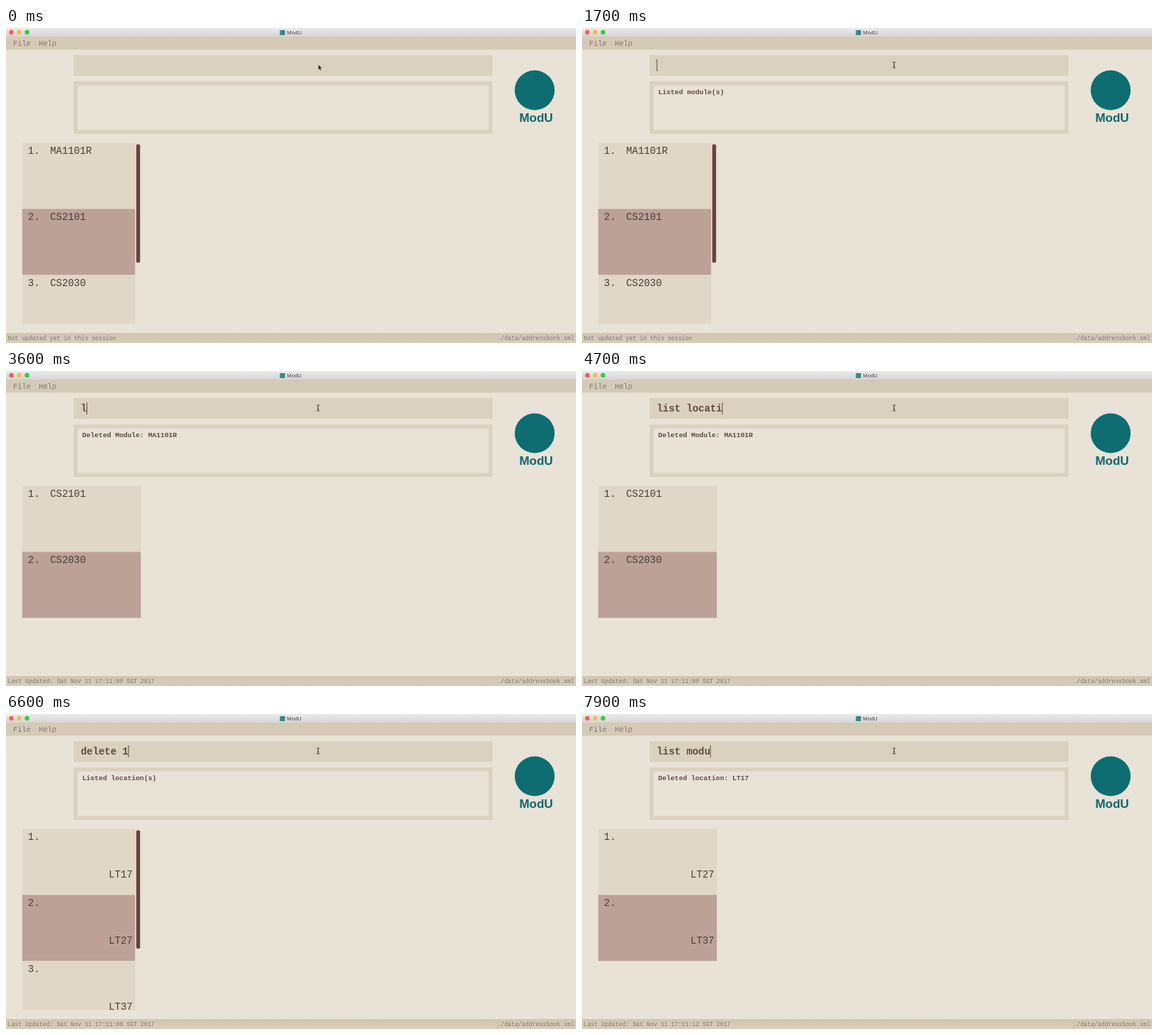
Animation, 800 px wide and 443 px high, one loop 8000 ms. Source, as an HTML page:

```html
<!DOCTYPE html>
<html lang="en">
<head>
<meta charset="utf-8">
<title>ModU</title>
<style>
html, body { margin: 0; width: 100%; height: 100%; overflow: hidden; background: #e8e2d7; }
svg { display: block; width: 100%; height: 100%; }
text { font-family: "Liberation Mono", "Courier New", monospace; white-space: pre; }
.title { font: 7.7px "Liberation Sans", Arial, sans-serif; fill: #484848; }
.menu { font-size: 10.3px; fill: #837a70; }
.command { font-size: 13.9px; font-weight: bold; fill: #644840; }
.result { font-size: 9.65px; font-weight: bold; fill: #644840; }
.row { font-size: 13.9px; fill: #46403b; }
.status { font-size: 8.18px; fill: #837a70; }
.brand { font: bold 17px "Liberation Sans", Arial, sans-serif; fill: #0d686c; }
</style>
</head>
<body>
<svg viewBox="0 0 800 443" preserveAspectRatio="none">
  <defs>
    <linearGradient id="chrome" x2="0" y2="1">
      <stop stop-color="#ebeaeb"/><stop offset="1" stop-color="#d6d4d6"/>
    </linearGradient>
    <linearGradient id="footer" x2="0" y2="1">
      <stop stop-color="#d0c5b0"/><stop offset="1" stop-color="#d7cdba"/>
    </linearGradient>
    <clipPath id="listArea"><rect x="22" y="161" width="170" height="255"/></clipPath>
  </defs>
  <rect width="800" height="443" fill="#e8e2d7"/>

  <rect width="800" height="12" fill="url(#chrome)"/>
  <circle cx="7.5" cy="6" r="3.2" fill="#fc5b57"/>
  <circle cx="18.5" cy="6" r="3.2" fill="#fdbc40"/>
  <circle cx="29.5" cy="6" r="3.2" fill="#34c84a"/>
  <rect x="384.5" y="3" width="7" height="7" fill="#398489"/>
  <text class="title" x="394.3" y="8.9">ModU</text>

  <rect y="12" width="800" height="18.5" fill="#d5cab5"/>
  <text class="menu" x="10" y="24.8">File</text>
  <text class="menu" x="46" y="24.8">Help</text>

  <rect x="95" y="38" width="587.7" height="29.3" fill="#dad1be"/>
  <text class="command" id="command" x="105" y="56.9"></text>
  <path id="caret" d="M0 44V61" stroke="#644840" stroke-width="1"/>

  <rect x="95" y="75.3" width="587.7" height="73.7" fill="#dad1be"/>
  <rect x="100.4" y="80.6" width="577" height="62.8" fill="#e8e2d7"/>
  <text class="result" id="result" x="107" y="93.1"></text>

  <circle cx="742" cy="87.5" r="28" fill="#0d6d70"/>
  <text class="brand" x="744" y="132" text-anchor="middle">ModU</text>

  <g id="list" clip-path="url(#listArea)"></g>
  <rect id="scrollbar" x="182.8" y="163.5" width="5.4" height="166.5" rx="2" fill="#6a443d"/>

  <rect y="429" width="800" height="14" fill="url(#footer)"/>
  <text class="status" id="status" x="2.5" y="439.4"></text>
  <text class="status" x="797.5" y="439.4" text-anchor="end">./data/addressbook.xml</text>

  <path id="arrow" d="M438.2 51.3V59.2L440 57.5L441.2 60.2L442.5 59.6L441.3 57H443.8Z"
        fill="#111" stroke="#fff" stroke-width=".5"/>
  <path id="beam" d="M435.9 47.8Q438 47.8 438 49.2Q438 47.8 440.1 47.8M438 49V55M435.9 56.2Q438 56.2 438 54.8Q438 56.2 440.1 56.2M437 52.8H439"
        fill="none" stroke="#333" stroke-width=".9"/>
</svg>
<script>
const DURATION = 8000, FOCUS = 150, CHAR = 8.34;
const LEFT = 22.7, TOP = 161.6, ROW = 92.85;
const $ = id => document.getElementById(id);

// Each command is typed one character per step and cleared when entered.
const commands = [
  { text: "list module", start: 240, step: 90, enter: 1350 },
  { text: "delete 1", start: 1900, step: 115, enter: 2950 },
  { text: "list location", start: 3580, step: 105, enter: 5050 },
  { text: "delete 1", start: 5560, step: 130, enter: 6800 },
  { text: "list module", start: 7020, step: 100, enter: DURATION }
];

const fresh = "Not updated yet in this session";
const updated = second => `Last Updated: Sat Nov 11 17:11:${second} SGT 2017`;
const modules = ["MA1101R", "CS2101", "CS2030"];
const places = ["LT17", "LT27", "LT37"];

// One view per number of commands entered.
const views = [
  { result: "", items: modules, status: fresh },
  { result: "Listed module(s)", items: modules, status: fresh },
  { result: "Deleted Module: MA1101R", items: modules.slice(1), status: updated("08") },
  { result: "Listed location(s)", items: places, status: updated("08"), located: true },
  { result: "Deleted location: LT17", items: places.slice(1), status: updated("12"), located: true }
];

function rowMarkup(item, index, view) {
  const width = view.items.length > 2 ? 158.5 : 166.6;
  const y = TOP + index * ROW;
  const label = view.located
    ? `<text class="row" x="${LEFT + width - 3.6}" y="${y + 68.8}" text-anchor="end">${item}</text>`
    : `<text class="row" x="62" y="${y + 15.8}">${item}</text>`;
  return `<rect x="${LEFT}" y="${y}" width="${width}" height="${ROW}" fill="${index % 2 ? "#bca199" : "#e0d7c8"}"/>
    <text class="row" x="30.8" y="${y + 15.8}">${index + 1}.</text>${label}`;
}

let shown;
function showView(view) {
  if (view === shown) return;
  shown = view;
  $("result").textContent = view.result;
  $("status").textContent = view.status;
  $("list").innerHTML = view.items.map((item, i) => rowMarkup(item, i, view)).join("");
  setVisible("scrollbar", view.items.length > 2);
}

function setVisible(id, on) {
  $(id).setAttribute("visibility", on ? "visible" : "hidden");
}

function render(t) {
  const entered = commands.filter(c => t >= c.enter).length;
  const { text, start, step } = commands[entered];
  const count = Math.max(0, Math.min(text.length, Math.floor((t - start) / step) + 1));
  const lastInput = count ? start + (count - 1) * step
    : entered ? commands[entered - 1].enter : FOCUS;

  showView(views[entered]);
  $("command").textContent = text.slice(0, count);
  $("caret").setAttribute("transform", `translate(${105.2 + count * CHAR})`);
  setVisible("caret", t >= FOCUS && (t - lastInput) % 1000 < 500);
  setVisible("arrow", t < FOCUS);
  setVisible("beam", t >= FOCUS);
}

const origin = performance.now();
function tick() {
  render((performance.now() - origin) % DURATION);
  requestAnimationFrame(tick);
}
tick();
</script>
</body>
</html>
```
